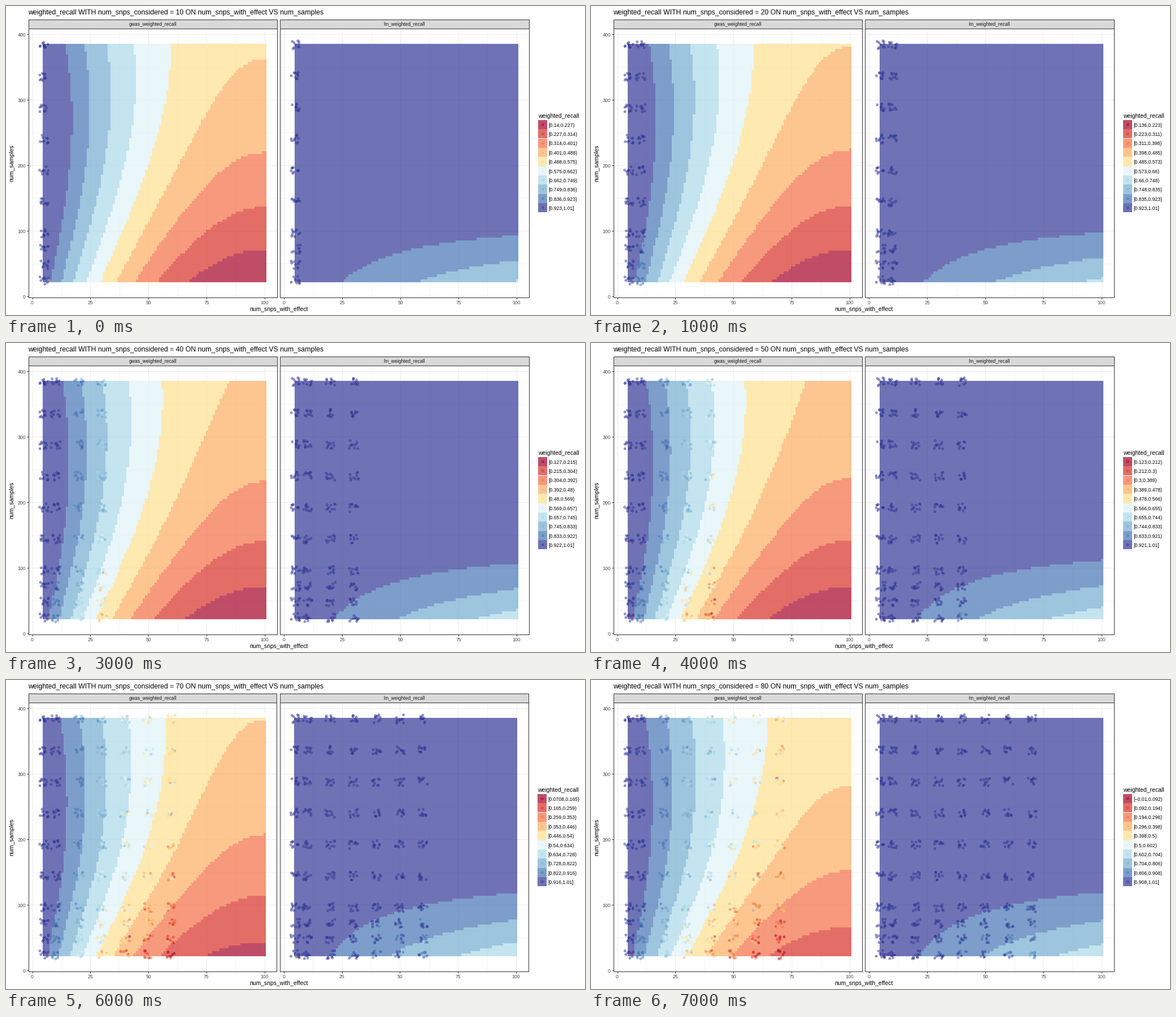
Write a matplotlib script that moves like this. It is 1025 by 547 pixels and loops after 8000 ms.

```python
import numpy as np
import matplotlib.pyplot as plt
from matplotlib.animation import FuncAnimation
from matplotlib.colors import ListedColormap
from matplotlib.patches import Rectangle

W, H, DPI = 1025, 547, 64
PX = 72 / DPI  # points per pixel
plt.rcParams["font.family"] = "Liberation Sans"

PALETTE = ["#A50026", "#D73027", "#F46D43", "#FDAE61", "#FEE090",
           "#E0F3F8", "#ABD9E9", "#74ADD1", "#4575B4", "#313695"]
CMAP = ListedColormap(PALETTE)
GRID, FRAME, TICK_TEXT = "#EBEBEB", "#333333", "#4D4D4D"

EFFECTS = [5, 10, 20, 30, 40, 50, 60, 70]
SAMPLES = [24, 48, 72, 96, 144, 192, 240, 288, 336, 384]
REPEATS = 10
LOWEST = [.14, .1357, .1314, .127, .1229, .06099, .0708, -.01]
HIGHEST = 1.01
PANEL_STEP = 445.8  # distance between the two panels


def to_x(v, panel, tight=0):
    return 46.5 + PANEL_STEP * panel + v * 4.116 - tight * (.5 * panel + v * .005)


def to_y(v):
    return 514 - 1.159 * v


def gwas_recall(effect, samples, n):
    """Falls from a peak at few effects to a floor that rises with samples."""
    k = n - 10
    floor = (.112 + .00174 * samples - 1.94e-6 * samples ** 2) * (1 - .0016 * k)
    height = .95 - (.00089 - 8e-7 * k) * samples
    w = (samples - 204) / 180
    power = 2.02 + .23 * w ** 2 + .005 * k * np.minimum(w, 0) ** 2
    return floor + height * np.maximum(1 - effect / 100, 0) ** power


def lm_recall(effect, samples, n):
    """Close to one, with a loss that fades as samples grow."""
    k = n - 10
    loss = (.00333 * effect - 7.6e-6 * effect ** 2) * (1 + .0053 * k)
    fade = np.clip(1 - (samples - 22) / (130 + .5 * k), 0, 1) ** 1.5
    return 1 - loss * fade


RECALL = (gwas_recall, lm_recall)


def to_class(recall, low):
    share = (recall - low) / (HIGHEST - low)
    return np.clip(np.floor(10 * share), 0, 9).astype(int)


def make_cloud(seed):
    """Jittered observations: effect, samples, x, y and noise."""
    rng = np.random.default_rng(seed)
    e, s, _ = (g.ravel() for g in np.meshgrid(
        EFFECTS, SAMPLES, np.arange(REPEATS), indexing="ij"))
    x = e + rng.uniform(-2, 2, e.size)
    y = s + rng.uniform(-6.4, 6.4, e.size)
    return e, s, x, y, rng.normal(size=e.size)


CLOUDS = [make_cloud(4), make_cloud(9)]


def label(x, y, s, size, color="black", **kw):
    kw = {"ha": "left", "va": "center_baseline", **kw}
    ax.text(x, y, s, fontsize=size * PX, color=color, **kw)


def line(xs, ys, color, width=1):
    ax.plot(xs, ys, color=color, lw=width * PX, solid_capstyle="butt")


def box(x, y, w, h, fill):
    ax.add_patch(Rectangle((x, y), w, h, fc=fill, ec=FRAME, lw=PX, zorder=5))


def dots(x, y, cls):
    colors = [PALETTE[c] for c in cls]
    ax.scatter(x, y, s=(3.8 * PX) ** 2, facecolors="none",
               edgecolors=colors, linewidths=.65 * PX, zorder=4)
    ax.scatter(x, y, s=(1.7 * PX) ** 2, c=colors, linewidths=0, zorder=4)


def draw_points(panel, n, low, tight):
    e, s, x, y, noise = CLOUDS[panel]
    loss = 1 - RECALL[panel](e, s, n)
    if panel == 0:
        loss = loss * (1 + .18 * noise) + e / 600 * np.exp((24 - s) / 30)
    else:
        loss = loss * (.6 + .2 * noise)
    loss[0] = .5 + .004 * n  # lone poor fit at the smallest setting
    keep = e < n
    dots(to_x(x[keep], panel, tight), to_y(y[keep]),
         to_class(1 - loss[keep], low))


def draw_panel(panel, n, low, tight):
    left = 39.5 + (PANEL_STEP - tight * .5) * panel
    width = 440.3 - tight * .5
    right = left + width
    for v in np.arange(0, 101, 12.5):
        gx = to_x(v, panel, tight)
        line([gx, gx], [39, 516], GRID, .5 if v % 25 else 1)
    for v in range(0, 401, 50):
        line([left, right], [to_y(v)] * 2, GRID, .5 if v % 100 else 1)

    effect, samples = np.meshgrid(np.arange(5, 101), np.arange(384, 23, -4))
    ax.imshow(to_class(RECALL[panel](effect, samples, n), low),
              cmap=CMAP, vmin=-.5, vmax=9.5, alpha=.7, aspect="auto",
              interpolation="nearest", zorder=3,
              extent=(to_x(4.5, panel, tight), to_x(100.5, panel, tight),
                      to_y(22), to_y(386)))
    draw_points(panel, n, low, tight)

    box(left, 39.5, width, 476.5, "none")
    box(left, 23.5, width, 16, "#D9D9D9")
    name = ("gwas", "lm")[panel] + "_weighted_recall"
    label((left + right) / 2, 31.5, name, 8.5, "#1A1A1A", ha="center",
          zorder=6)
    for v in range(0, 101, 25):
        tx = to_x(v, panel, tight)
        line([tx, tx], [516, 519], FRAME)
        label(tx, 524.5, str(v), 8.6, TICK_TEXT, ha="center")


def range_labels(low):
    b = [f"{v:.3g}".replace("-", "\u2212") for v in np.linspace(low, HIGHEST, 11)]
    return [f"[{b[i]},{b[i + 1]}" + (")" if i < 9 else "]") for i in range(10)]


def draw_legend(names, left):
    label(left, 194, "weighted_recall", 10.4)
    for i, name in enumerate(names):
        y = 210 + 16.35 * i
        ax.add_patch(Rectangle((left, y - 8.2), 16.4, 16.35, fc=PALETTE[i],
                               alpha=.7, lw=0))
        dots([left + 8.2], [y], [i])
        label(left + 18, y + .3, name, 8.6)


def update(i):
    n, low = 10 * (i + 1), LOWEST[i]
    names = range_labels(low)
    tight = max(map(len, names)) - 13  # longer labels squeeze the panels
    ax.clear()
    ax.set_axis_off()
    ax.set_xlim(0, W)
    ax.set_ylim(H, 0)
    label(39, 10, f"weighted_recall WITH num_snps_considered = {n} "
          "ON num_snps_with_effect VS num_samples", 12.22)
    for panel in (0, 1):
        draw_panel(panel, n, low, tight)
    for v in range(0, 401, 100):
        line([36.5, 39.5], [to_y(v)] * 2, FRAME)
        label(35, to_y(v), str(v), 8.6, TICK_TEXT, ha="right")
    label(483, 536, "num_snps_with_effect", 10.4, ha="center")
    label(10, 278, "num_samples", 10.5, ha="center", va="center", rotation=90)
    draw_legend(names, 942 - tight)
    return []


fig = plt.figure(figsize=(W / DPI, H / DPI), dpi=DPI, facecolor="white")
ax = fig.add_axes([0, 0, 1, 1])
anim = FuncAnimation(fig, update, frames=8, init_func=lambda: [],
                     interval=1000, repeat=True, repeat_delay=0)
plt.show()
```
